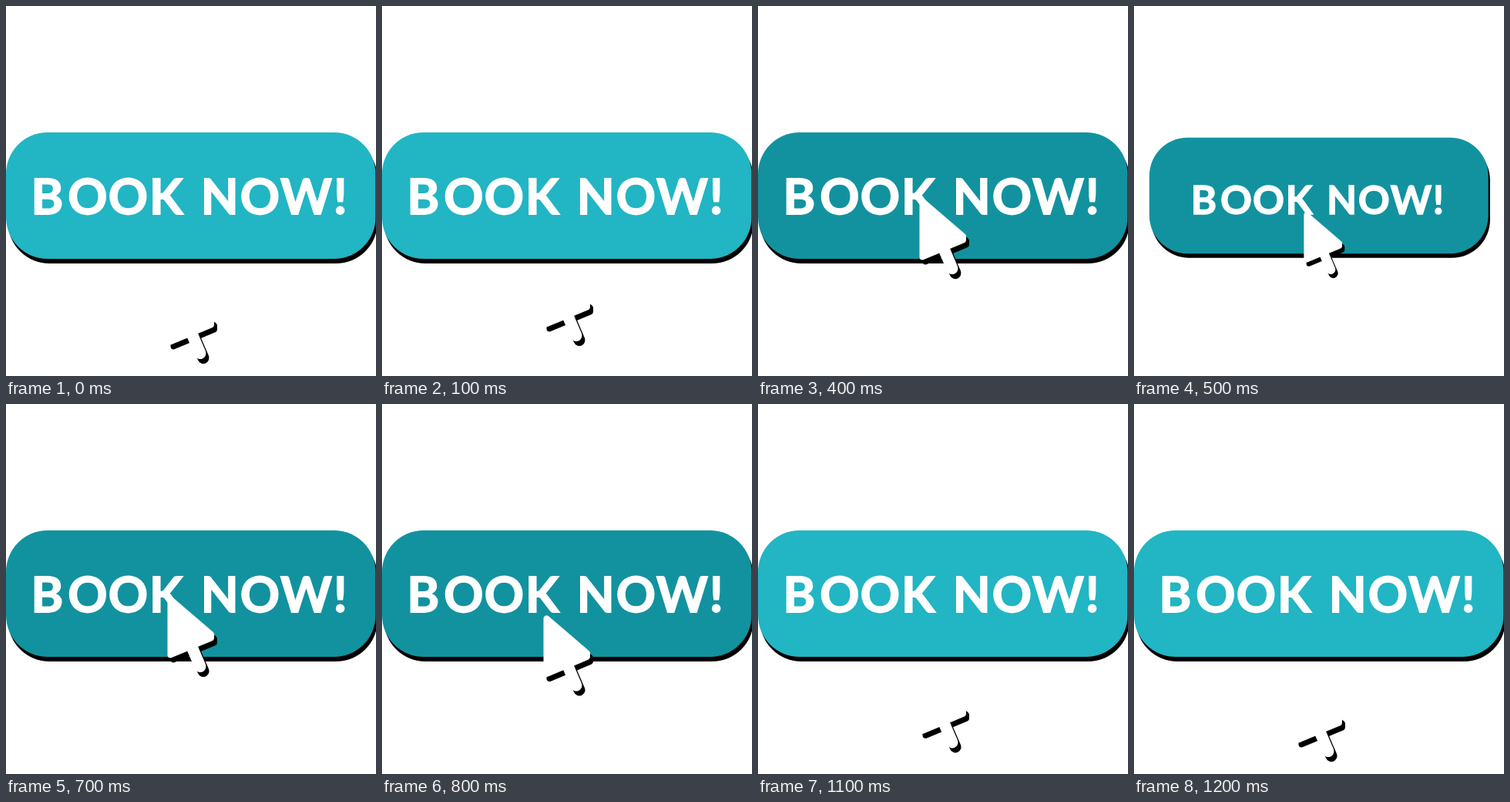
An HTML page for the animation above (1.3 s loop, 480 by 480 pixels).

```html
<!DOCTYPE html>
<html lang="en">
<head>
<meta charset="utf-8">
<title>Book now button</title>
<style>
  html, body { margin: 0; height: 100%; overflow: hidden; background: #fff; }
  svg { display: block; width: 100vw; height: 100vh; }
  text { font: 700 63.5px Lato, sans-serif; fill: #fff; stroke: #fff; stroke-width: 1.8px; }
</style>
</head>
<body>
<svg viewBox="0 0 480 480">
  <defs>
    <rect id="pill" y="164" width="479.5" height="164" rx="54"/>
    <g id="arrow" fill="currentColor" stroke="currentColor" stroke-linejoin="round" stroke-linecap="round">
      <path d="M213.5 253.8V325.4L266 303.5V298.8Z" stroke-width="8"/>
      <path d="M238 308L252 340.5" stroke-width="15"/>
    </g>
  </defs>
  <g id="button">
    <use href="#pill" x="2.5" y="6"/>
    <use href="#pill" id="face"/>
  </g>
  <g id="label">
    <text x="32.5" y="269.8" letter-spacing="3" dx="0 3 -2 -1">BOOK</text>
    <text x="252.8" y="269.8" letter-spacing="2">NOW!</text>
  </g>
  <g id="cursor">
    <use href="#arrow" x="4" y="6" color="#000"/>
    <use href="#arrow" color="#fff"/>
  </g>
</svg>
<script>
const LOOP = 1300, STEP = 100, REST = 110, HOVER = 79;
const [button, face, label, cursor] =
  ['button', 'face', 'label', 'cursor'].map(id => document.getElementById(id));

const scaleAt = (x, y, s) => `translate(${x} ${y}) scale(${s}) translate(${-x} ${-y})`;

// Distance of the cursor below its clicking position
function drop(step) {
  const travel = step < 4 ? 29 * (4 - step) : 24.6 * Math.max(0, step - 7);
  return Math.min(REST, travel);
}

function draw(now) {
  const step = Math.floor(now % LOOP / STEP);
  const pressed = step === 5 || step === 6;
  const y = drop(step);
  face.setAttribute('fill', y < HOVER ? '#12929f' : '#22b5c4');
  button.setAttribute('transform', scaleAt(240, 246, pressed ? .917 : 1));
  label.setAttribute('transform', scaleAt(239.3, 270, pressed ? .8 : 1));
  cursor.setAttribute('transform', `translate(0 ${y}) ` + scaleAt(270, 348, pressed ? .82 : 1));
}

const start = performance.now();
function tick() {
  draw(performance.now() - start);
  requestAnimationFrame(tick);
}
tick();
</script>
</body>
</html>
```
